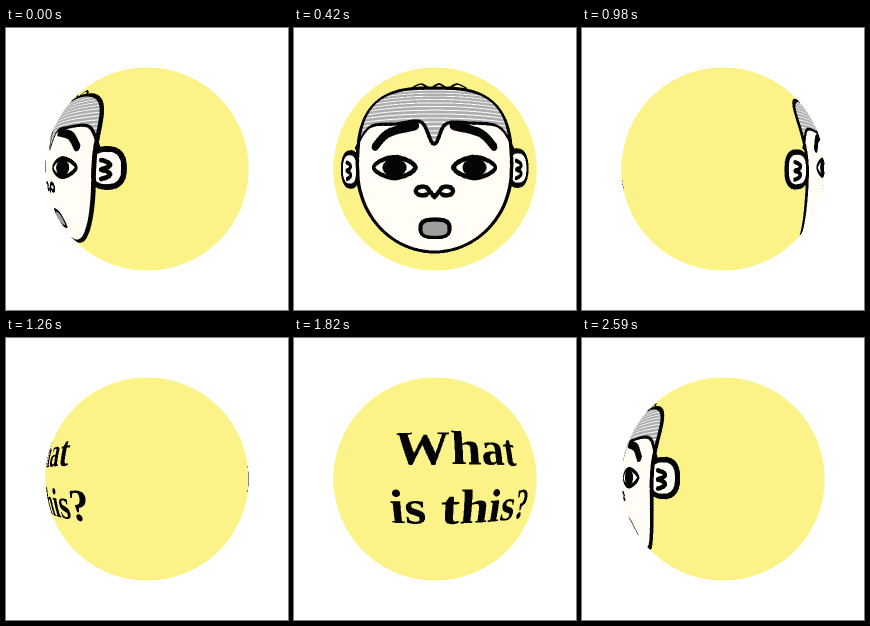
An HTML page with a canvas that plays this animation: 282x282 px, repeating every 2660 ms.

```html
<!DOCTYPE html>
<html lang="en">
<head>
<meta charset="utf-8">
<title>Spinning ball</title>
<style>
  html, body { margin: 0; width: 100%; height: 100%; overflow: hidden; background: #fff; }
  canvas { display: block; width: 282px; height: 282px; }
</style>
</head>
<body>
<canvas id="stage" width="282" height="282" role="img" aria-label="What is this?"></canvas>
<script>
const STEPS = 38, STEP_MS = 70, TURN = 360 / STEPS;
const MID = 141, R = 101.6;
const EYE = 2.8;                                // camera distance in ball radii
const FOCAL = R * Math.sqrt(EYE * EYE - 1);
const FRONT = 6;                                // step at which the face looks ahead
const PX = 6, WEST = -90, NORTH = -70;          // texture pixels per degree, top left corner
const DEG = 180 / Math.PI;
const YELLOW = '#fbf388', SKIN = '#fffdf5', INK = '#050505';

// Stage point to [longitude, latitude] on the ball, or null beside it.
function unproject(x, y) {
  const X = (x - MID) / FOCAL, Y = (y - MID) / FOCAL, rr = X * X + Y * Y;
  const disc = 1 - (EYE * EYE - 1) * rr;
  if (disc < 0) return null;
  const s = (EYE - Math.sqrt(disc)) / (1 + rr);
  return [Math.atan2(X * s, EYE - s) * DEG, Math.asin(Y * s) * DEG];
}

const tex = document.createElement('canvas');
tex.width = 360 * PX;
tex.height = 140 * PX;
const g = tex.getContext('2d', { willReadFrequently: true });
g.fillStyle = YELLOW;
g.fillRect(0, 0, tex.width, tex.height);
g.scale(PX, PX);
g.translate(-WEST, -NORTH);
g.lineCap = g.lineJoin = 'round';

const points = (n, at) => Array.from({ length: n + 1 }, (_, i) => at(i / n));

// Smooth path through stage points as seen at the given step.
function curve(pts, step = FRONT) {
  const p = pts.map(([x, y]) => {
    const [lon, lat] = unproject(x, y);
    return [lon - (step - FRONT) * TURN, lat];
  });
  const path = new Path2D();
  path.moveTo(...p[0]);
  for (let i = 0; i < p.length - 1; i++) {
    const b = p[i], c = p[i + 1], a = p[i - 1] || b, d = p[i + 2] || c;
    path.bezierCurveTo(
      b[0] + (c[0] - a[0]) / 6, b[1] + (c[1] - a[1]) / 6,
      c[0] - (d[0] - b[0]) / 6, c[1] - (d[1] - b[1]) / 6, c[0], c[1]);
  }
  return path;
}

// Superellipse: power 2 is round, more is boxy, less is pointed.
function oval(cx, cy, rx, ry, top = 2, bottom = top, step = FRONT) {
  return curve(points(48, t => {
    const c = Math.cos(t * 2 * Math.PI), s = Math.sin(t * 2 * Math.PI);
    const e = 2 / (s < 0 ? top : bottom);
    return [cx + rx * Math.sign(c) * Math.abs(c) ** e, cy + ry * Math.sign(s) * Math.abs(s) ** e];
  }), step);
}

function fill(path, color) { g.fillStyle = color; g.fill(path); }
function line(path, width, color = INK) {
  g.strokeStyle = color;
  g.lineWidth = width;
  g.stroke(path);
}
function shape(path, color, width) { fill(path, color); line(path, width); }

function drawEar(cx, cy, foldX, step) {
  shape(oval(cx, cy, 17, 19, 2.5, 2.5, step), SKIN, 2.3);
  const fold = points(16, t => [foldX - 4 + 9 * Math.abs(Math.sin(t * 2 * Math.PI)) ** 0.8, cy - 8 + 19 * t]);
  line(curve(fold, step), 1.9);
}

function drawHair(head) {
  const hairline = [[62, 120], [76, 99], [102, 96], [127, 94], [140, 116],
    [152, 96], [176, 95], [205, 99], [219, 120]];
  const hair = curve(hairline);
  hair.lineTo(60, -60);
  hair.lineTo(-60, -60);
  g.save();
  g.clip(head);
  fill(hair, '#adadad');
  g.clip(hair);
  for (let lat = -40; lat < -8; lat += 1.9) {
    const row = new Path2D();
    row.moveTo(-60, lat);
    row.lineTo(60, lat);
    line(row, 0.5, '#fff');
  }
  g.restore();
  line(curve(hairline), 1.5);
}

function drawFace() {
  drawEar(101, 140, 99, 0);
  drawEar(131, 141.5, 130, 10);

  const head = oval(140.5, 142, 77, 82, 3, 2);
  fill(head, SKIN);
  drawHair(head);
  line(head, 2.3);
  line(curve(points(6, t => [118 + 54 * t, 60 - 4 * Math.abs(Math.sin(t * 3 * Math.PI))])), 1.3);

  for (const side of [-1, 1]) {
    const x = d => 140.5 + side * d;
    line(curve([[x(20), 98], [x(46), 105], [x(59), 118]]), 4);
    shape(oval(x(40), 139.5, 21, 10.5, 1.6), SKIN, 1.8);
    fill(oval(x(40), 139.5, 12, 9), INK);

    const nostril = points(12, t => {
      const a = 2.3 - 5.3 * t;
      return [x(12 + 6.5 * Math.cos(a)), 163 + 4.5 * Math.sin(a)];
    });
    line(curve([...nostril, [x(0), 169]]), 1.8);
  }
  shape(oval(141, 200.5, 14.5, 9, 2.8), '#9e9e9e', 1.9);
}

function drawText(text, lon, lat) {
  g.save();
  g.translate(lon, lat);
  g.scale(1.16 / 10, 1 / 10);
  g.font = 'bold 202px "Liberation Serif", "Times New Roman", serif';
  g.fillStyle = INK;
  g.fillText(text, 0, 0);
  g.restore();
}

drawFace();
drawText('What', 153.4, -5.8);
drawText('is this?', 151.4, 18.2);

// Four samples per stage pixel: texture column and row offset, -1 beside the ball.
const texels = new Uint32Array(g.getImageData(0, 0, tex.width, tex.height).data.buffer);
const LEFT = Math.floor(MID - R), SIZE = 2 * (MID - LEFT);
const cols = new Float32Array(SIZE * SIZE * 4), rows = new Int32Array(SIZE * SIZE * 4);
for (let i = 0; i < cols.length; i++) {
  const px = i >> 2, sub = i & 3;
  const x = LEFT + px % SIZE + 0.25 + (sub & 1) / 2;
  const y = LEFT + Math.floor(px / SIZE) + 0.25 + (sub >> 1) / 2;
  const hit = unproject(x, y);
  rows[i] = hit ? Math.floor((hit[1] - NORTH) * PX) * tex.width : -1;
  cols[i] = hit ? (hit[0] - WEST) * PX : 0;
}

const ctx = document.getElementById('stage').getContext('2d');
const view = ctx.createImageData(SIZE, SIZE);

function render(step) {
  const w = tex.width, shift = (FRONT - step) * TURN * PX + 2 * w;
  for (let px = 0, i = 0; px < SIZE * SIZE; px++) {
    let r = 0, gr = 0, b = 0;
    for (let s = 0; s < 4; s++, i++) {
      const c = rows[i] < 0 ? 0xffffffff : texels[rows[i] + Math.floor(cols[i] + shift) % w];
      r += c & 255;
      gr += c >> 8 & 255;
      b += c >> 16 & 255;
    }
    const o = px * 4;
    view.data[o] = r / 4;
    view.data[o + 1] = gr / 4;
    view.data[o + 2] = b / 4;
    view.data[o + 3] = 255;
  }
  ctx.putImageData(view, LEFT, LEFT);
}

let shown = -1;
const start = performance.now();
function tick() {
  const step = Math.floor((performance.now() - start) / STEP_MS) % STEPS;
  if (step !== shown) render(shown = step);
  requestAnimationFrame(tick);
}
tick();
</script>
</body>
</html>
```
